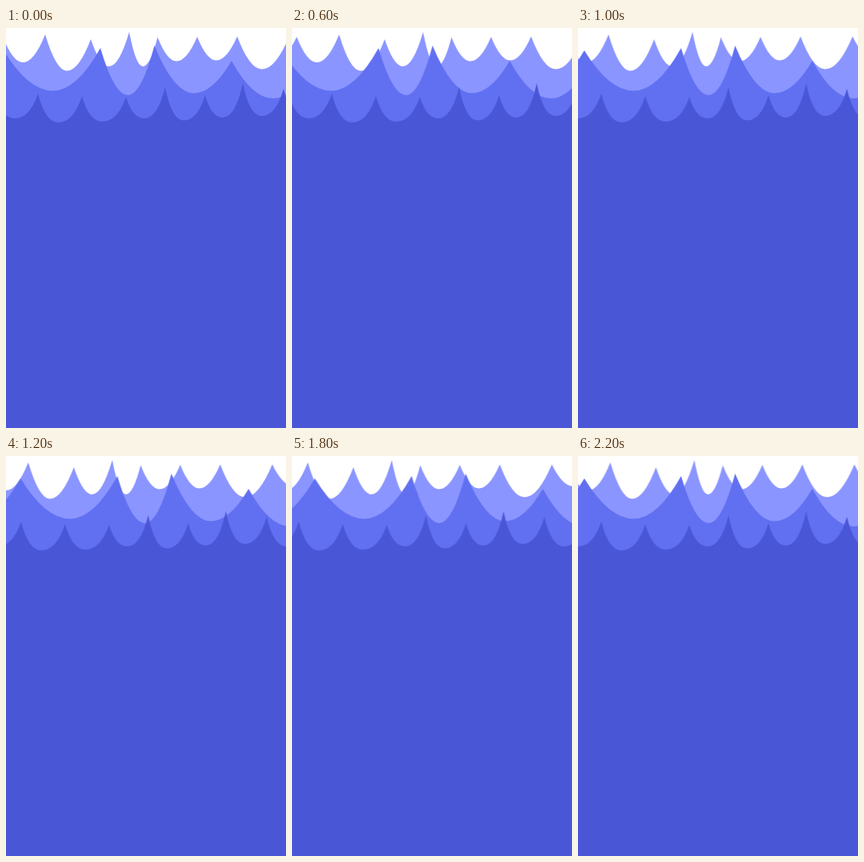
Write an HTML page that moves like this. It is 350 by 500 pixels and loops after 2400 ms.

```html
<!DOCTYPE html>
<html lang="en">
<head>
<meta charset="utf-8">
<title>Waves</title>
<style>
  html, body { margin: 0; width: 100%; height: 100%; overflow: hidden; background: #fff; }
  svg { display: block; width: 350px; height: 500px; }
</style>
</head>
<body>
<svg id="sea" viewBox="0 0 350 500"></svg>
<script>
const LOOP = 2400;
const STEPS = 12;
const SPEED = 0.0517; // px per ms
const HOME = 790;     // time at which a layer passes its start again
const FLOOR = 520;

// crests: [x, y, depth of the trough that follows]
// lean: where a trough lies between its crests; bulge: low is steep at the crest
const layers = [
  {
    color: '#8b95ff', lean: .475, bulge: .5, way: 1, turn: 1578,
    crests: [
      [-56, 11, 40], [-4, 11, 43], [49, 8, 53.5], [106, 14, 48], [154, 5, 48],
      [189.5, 11.5, 41.5], [239, 11, 40.5], [289, 10.5, 51.5], [354, 10.5, 38], [411, 11]
    ]
  },
  {
    color: '#6170f1', lean: .51, bulge: .5, way: -1, turn: 1600,
    crests: [
      [-123, 28, 79], [-3, 28, 78.5], [118, 25, 84], [185.5, 22, 81.5],
      [282, 41, 88], [383, 42]
    ]
  },
  {
    color: '#4957d7', lean: .46, bulge: .36, way: 1, turn: 1600,
    crests: [
      [-14, 83, 113], [40, 82, 118], [95, 85, 117], [150, 86, 113], [199, 74, 115.5],
      [249, 84, 112], [296, 69, 110], [347, 76, 113], [400, 80]
    ]
  }
];

const mix = (a, b, k) => a + (b - a) * k;

// Each trough is two curves that meet level at its lowest point.
function wavePath({ crests, lean, bulge }) {
  const [x0, y0] = crests[0];
  let d = `M-130 ${FLOOR}V${y0}H${x0}`;
  for (let i = 0; i < crests.length - 1; i++) {
    const [x, , low] = crests[i];
    const [nextX, nextY] = crests[i + 1];
    const mid = mix(x, nextX, lean);
    d += `Q${mix(x, mid, bulge)} ${low} ${mid} ${low}`;
    d += `Q${mix(nextX, mid, bulge)} ${low} ${nextX} ${nextY}`;
  }
  return d + `H480V${FLOOR}Z`;
}

// Even drift out, back past the start to the turn, and home again.
const drift = (t, { way, turn }) =>
  way * SPEED * Math.min(t, Math.abs(t - turn) - (turn - HOME));

const sea = document.getElementById('sea');
for (const layer of layers) {
  const path = document.createElementNS('http://www.w3.org/2000/svg', 'path');
  path.setAttribute('d', wavePath(layer));
  path.setAttribute('fill', layer.color);
  sea.append(path);

  const frames = Array.from({ length: STEPS + 1 }, (_, i) => ({
    transform: `translateX(${drift((i % STEPS) * LOOP / STEPS, layer)}px)`,
    easing: 'step-end'
  }));
  path.animate(frames, { duration: LOOP, iterations: Infinity });
}
</script>
</body>
</html>
```
